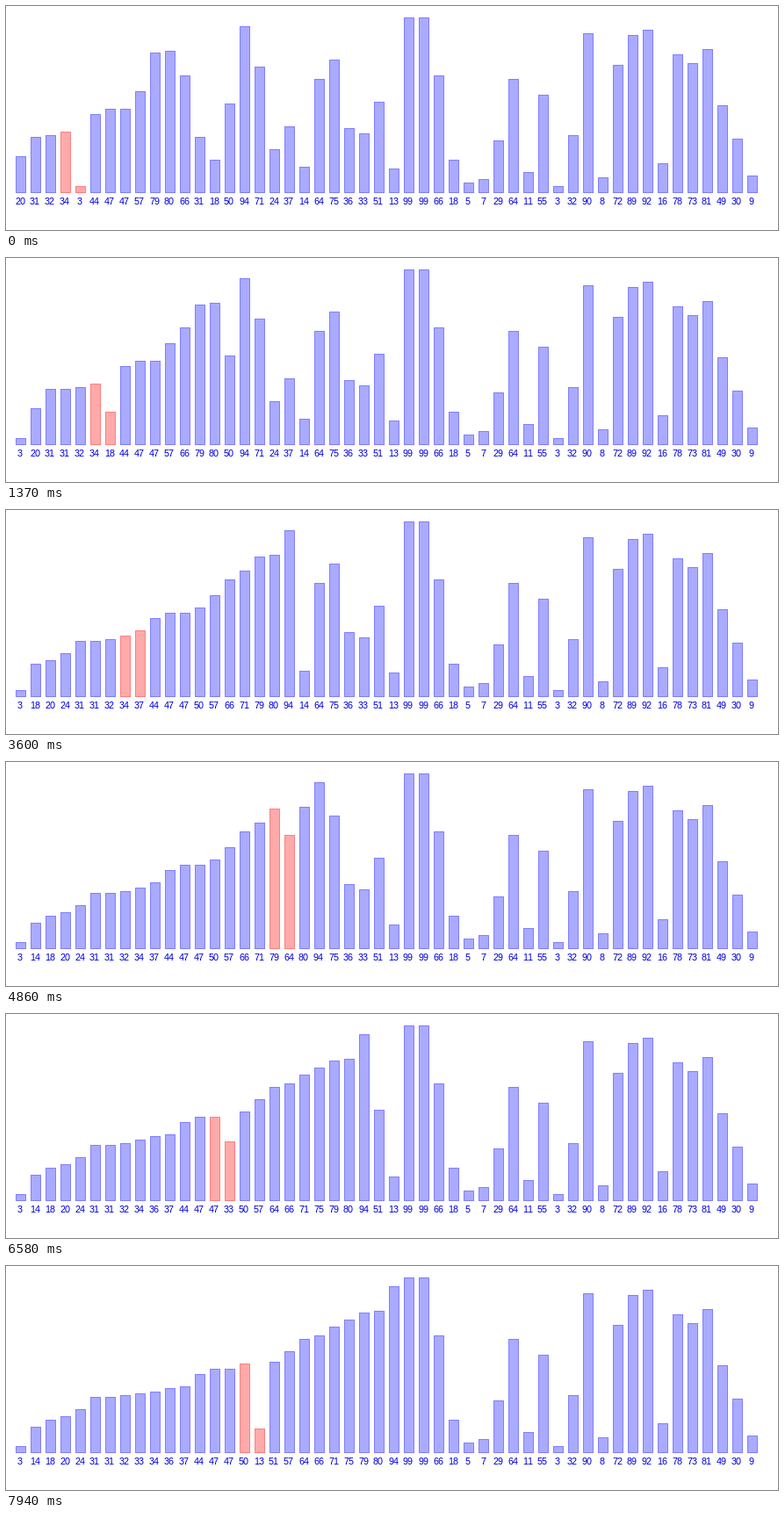
Write a matplotlib script that moves like this. It is 879 px wide and 255 px high and loops after 8000 ms.

```python
import numpy as np
import matplotlib.pyplot as plt
from matplotlib.animation import FuncAnimation
from matplotlib.collections import PolyCollection

W, H, DPI = 879, 255, 64
LOOP, TICK = 8000, 20
PX = 72 / DPI                      # one pixel in points
LEFT, PITCH, BAR, FLOOR = 11, 17, 12, 213
BLUE, BLUE_EDGE = "#aaaaff", "#7f7fff"
RED, RED_EDGE = "#ffaaaa", "#ff7f7f"

# Pacing: a picture lasts PERIOD ms and covers RATE swaps' worth of work;
# a comparison without a swap costs only a fraction of one.
PERIOD, LEAD = 139.8, 35
RATE, HEADSTART, CHECK_COST = 2.361, 0.8, 0.3

VALUES = [20, 31, 32, 34, 3, 44, 47, 47, 57, 79,
          80, 66, 31, 18, 50, 94, 71, 24, 37, 14,
          64, 75, 36, 33, 51, 13, 99, 99, 66, 18,
          5, 7, 29, 64, 11, 55, 3, 32, 90, 8,
          72, 89, 92, 16, 78, 73, 81, 49, 30, 9]


def insertion_sort(values, start):
    """Yield (work done, list, right index of the pair) per comparison."""
    a, work = list(values), 0.0
    for i in range(start, len(a)):
        for j in range(i, 0, -1):
            yield work, a[:], j
            if a[j - 1] <= a[j]:
                work += CHECK_COST
                break
            a[j - 1], a[j] = a[j], a[j - 1]
            work += 1


WORK, LISTS, RIGHTS = zip(*insertion_sort(VALUES, 4))

plt.rcParams.update({
    "font.family": "Liberation Sans",
    "text.hinting": "native",
    "text.hinting_factor": 1,
})
fig = plt.figure(figsize=(W / DPI, H / DPI), dpi=DPI, facecolor="white")
ax = fig.add_axes([0, 0, 1, 1])
ax.set(xlim=(0, W), ylim=(H, 0))
ax.axis("off")

bars = PolyCollection([], linewidths=PX, snap=False)
ax.add_collection(bars, autolim=False)
labels = [ax.text(0, 226, "", size=11 * PX, color="#0000dd",
                  ha="left", va="baseline") for _ in VALUES]


def outline(i, value):
    x0 = LEFT + PITCH * i + 0.5
    x1 = x0 + BAR - 1
    y0, y1 = 211 - 2 * value + 0.5, FLOOR - 0.5
    return [(x0, y0), (x1, y0), (x1, y1), (x0, y1)]


def draw(frame):
    now = frame * TICK + TICK / 2
    picture = (now + LEAD) // PERIOD
    step = np.searchsorted(WORK, picture * RATE + HEADSTART, side="right") - 1
    values, right = LISTS[step], RIGHTS[step]
    active = [i in (right - 1, right) for i in range(len(values))]
    bars.set_verts([outline(i, v) for i, v in enumerate(values)])
    bars.set_facecolor([RED if on else BLUE for on in active])
    bars.set_edgecolor([RED_EDGE if on else BLUE_EDGE for on in active])
    for i, (label, v) in enumerate(zip(labels, values)):
        label.set_text(str(v))
        label.set_x(LEFT + PITCH * i - 1 + (3 if v < 10 else 0))
    return [bars, *labels]


anim = FuncAnimation(fig, draw, frames=LOOP // TICK, interval=TICK,
                     repeat=True, repeat_delay=0)
plt.show()
```
